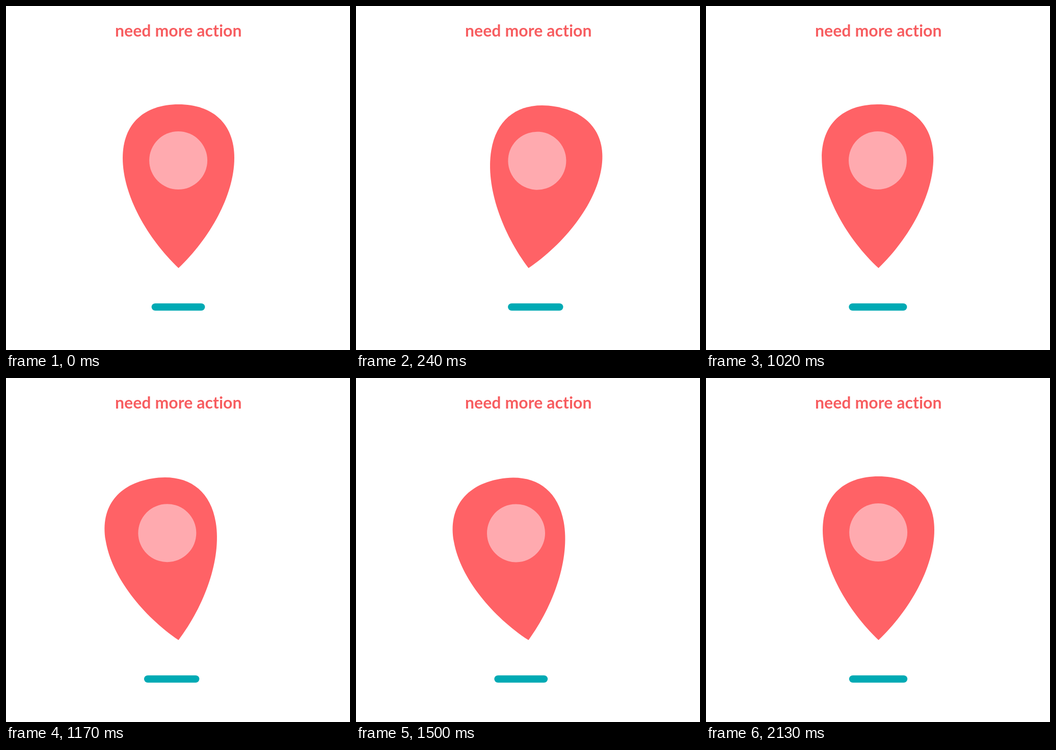
Recreate the animation shown at these times as an HTML page with a canvas. Size 675x675 px, loop 2.16 s.

```html
<!DOCTYPE html>
<html lang="en">
<head>
<meta charset="utf-8">
<title>Pin shake</title>
<style>
  html, body { margin: 0; width: 100%; height: 100%; overflow: hidden; background: #fff; }
  canvas { display: block; width: 675px; height: 675px; }
</style>
</head>
<body>
<canvas id="stage" width="675" height="675"></canvas>
<script>
const ctx = document.getElementById('stage').getContext('2d');

const STEP = 30, STEPS = 72;
const TIP = { x: 338.5, y: 514.3 };
const MAX_TILT = 15;

// One shake, measured in steps: ease in, swing side to side, ease out.
const SHAKE = { start: 33, firstPeak: 41, lastPeak: 53, end: 61, swing: 4 };
const EARLY_SHIFT = 47;   // the loop opens in the middle of a shake
const EARLY_END = 14;

const smooth = u => u * u * (3 - 2 * u);
const clamp = v => Math.min(1, Math.max(0, v));
const easeIn = u => Math.pow(clamp(u), 1.66);

function poseAt(step) {
  const s = step <= EARLY_END ? step + EARLY_SHIFT : step;
  const { start, firstPeak, lastPeak, end, swing } = SHAKE;
  if (s < firstPeak) {
    const amount = easeIn((s - start) / (firstPeak - start));
    return { tilt: -amount * MAX_TILT, squeeze: amount };
  }
  if (s > lastPeak) {
    const amount = easeIn((end - s) / (end - lastPeak));
    return { tilt: amount * MAX_TILT, squeeze: amount };
  }
  const phase = (s - firstPeak) / swing;
  const count = Math.floor(phase);
  const side = count % 2 ? 1 : -1;
  return { tilt: side * MAX_TILT * (1 - 2 * smooth(phase - count)), squeeze: 1 };
}

function aroundTip(degrees, draw) {
  ctx.save();
  ctx.translate(TIP.x, TIP.y);
  ctx.rotate(degrees * Math.PI / 180);
  ctx.beginPath();
  draw();
  ctx.fill();
  ctx.restore();
}

function pinPath() {
  ctx.moveTo(0, 0);
  ctx.bezierCurveTo(-61, -58, -109.5, -143, -109.5, -216);
  ctx.bezierCurveTo(-109.5, -284, -66.5, -321.3, 0, -321.3);
  ctx.bezierCurveTo(66.5, -321.3, 109.5, -284, 109.5, -216);
  ctx.bezierCurveTo(109.5, -143, 61, -58, 0, 0);
}

function drawTitle() {
  ctx.fillStyle = '#f75d60';
  ctx.font = '700 32px Lato, sans-serif';
  ctx.letterSpacing = '0.05px';   // any spacing turns ligatures off
  ctx.textAlign = 'center';
  ctx.fillText('need more action', 338.3, 60);
}

function drawBar(center, width) {
  ctx.strokeStyle = '#00aab4';
  ctx.lineWidth = 14.4;
  ctx.lineCap = 'round';
  ctx.beginPath();
  ctx.moveTo(center - width / 2 + 7, 590.6);
  ctx.lineTo(center + width / 2 - 7, 590.6);
  ctx.stroke();
}

function render(now) {
  const { tilt, squeeze } = poseAt(Math.floor(now / STEP) % STEPS);
  const left = tilt < 0;

  ctx.fillStyle = '#fff';
  ctx.fillRect(0, 0, 675, 675);
  drawTitle();

  ctx.fillStyle = '#ff6266';
  aroundTip(tilt, pinPath);
  ctx.fillStyle = '#ffaaaf';
  aroundTip(tilt * (left ? 0.635 : 0.505), () => ctx.arc(-0.4, -211.3, 57, 0, 2 * Math.PI));

  drawBar(338 + tilt * (left ? 1.38 : 1.54), 114 - 9.6 * squeeze);
}

const origin = performance.now();
function tick() {
  render(performance.now() - origin);
  requestAnimationFrame(tick);
}
tick();
</script>
</body>
</html>
```
